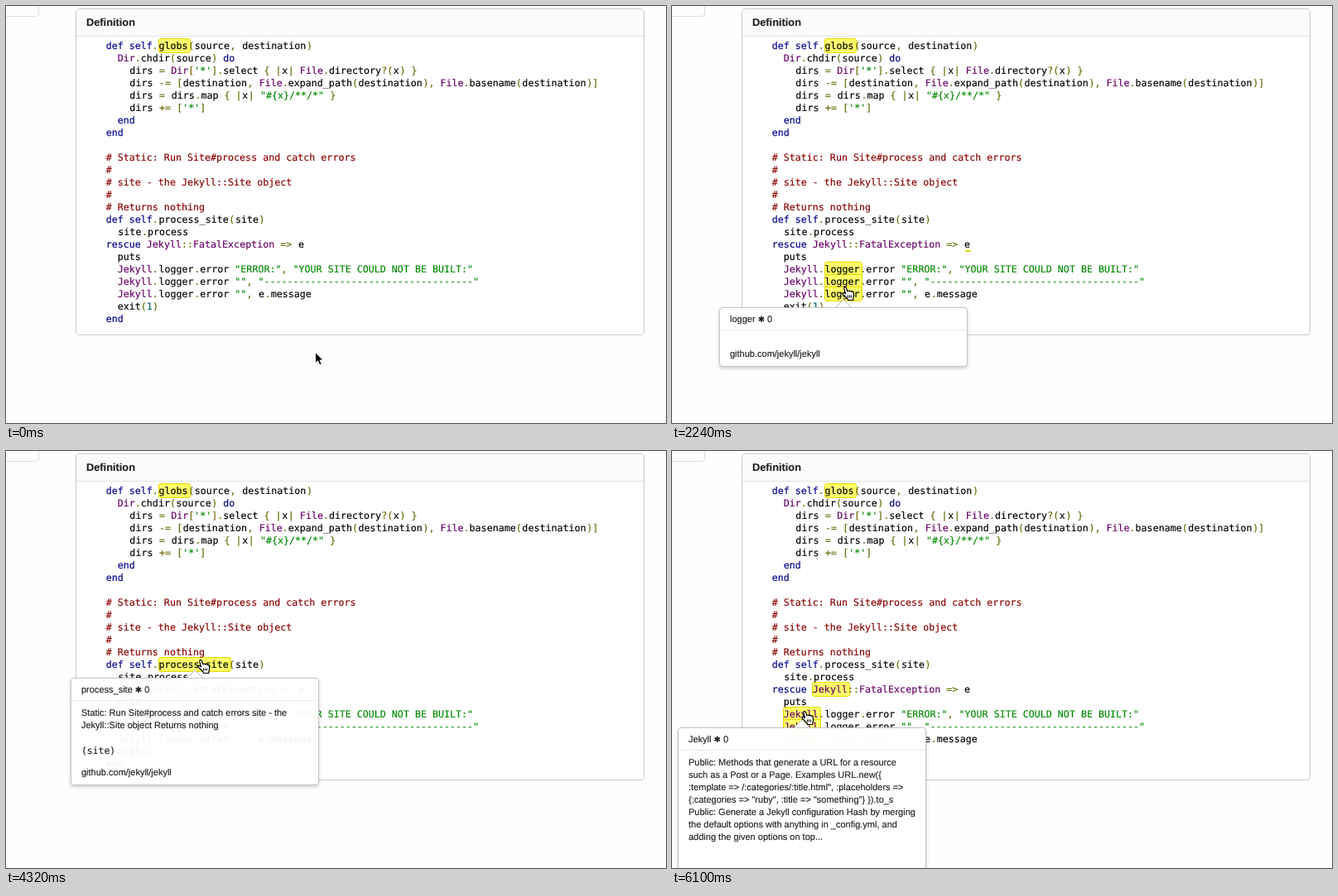
Recreate the animation shown at these times as an HTML page. Size 797 by 504 pixels, loop 8000 ms.

```html
<!DOCTYPE html>
<html lang="en">
<head>
<meta charset="utf-8">
<title>Definition</title>
<style>
html, body { margin: 0; width: 100%; height: 100%; overflow: hidden; }
body {
  position: relative; background: #fefefe; color: #222;
  font: 11px/15px "Liberation Sans", Arial, sans-serif;
  text-rendering: geometricPrecision; -webkit-text-stroke: .15px;
}
div, svg { position: absolute; box-sizing: border-box; }
#stage { left: 0; top: 0; width: 797px; height: 504px; overflow: hidden; }
#tab { left: -10px; top: -10px; width: 50px; height: 23px; border: 1px solid #ddd; border-radius: 4px; }
#panel { left: 84px; top: 3px; width: 687px; height: 395px; border: 1px solid #ccc; border-radius: 4px; background: #fff; }
#panel h1 {
  margin: 0; height: 33px; padding: 8px 12px 0; box-sizing: border-box;
  border-bottom: 1px solid #e2e2e2; border-radius: 3px 3px 0 0;
  background: #fbfbfb; font-size: 12.8px; line-height: 15px;
}
#code, .mono { font: 11.66px/15px "DejaVu Sans Mono", monospace; white-space: pre; }
#code { left: 120.7px; top: 40.5px; color: #000; }
.kwd { color: #008; } .typ { color: #606; } .pun { color: #660; }
.com { color: #800; } .str { color: #080; } .lit { color: #066; }
.ref { padding: 0 .6px; }
.mark { height: 18px; background: #ffff6a; border: 1px solid #e4d800; border-radius: 3px; }
#trace { left: 354px; top: 295px; width: 7px; height: 2px; background: #e4d800; }
.pop {
  width: 300px; border: 1px solid #c4c4c4; border-radius: 4px;
  box-shadow: 0 2px 4px rgba(0,0,0,.2); white-space: pre;
}
.pop::before {
  content: ""; position: absolute; left: 142px; top: -8px; width: 14px; height: 14px;
  box-sizing: border-box; border: solid #bbb; border-width: 1px 0 0 1px;
  background: inherit; transform: rotate(45deg); clip-path: polygon(0 0, 100% 0, 0 100%);
}
.pop div { left: 12px; }
.pop .head { left: 0; top: 0; width: 298px; height: 27px; padding: 7px 12px 0; border-bottom: 1px solid #ebebeb; }
.star { font: 10px/10px "DejaVu Sans", sans-serif; }
.pop .text { top: 35px; }
.pop .mono { top: 80px; font-size: 11.4px; }
.pop .repo { bottom: 6px; }
svg { left: 0; top: 0; overflow: visible; }
</style>
</head>
<body>
<div id="stage">
  <div id="tab"></div>
  <div id="panel"><h1>Definition</h1></div>
  <div id="marks"></div>
  <div id="trace"></div>
  <div id="code"></div>
  <div id="pops"></div>
  <svg id="cursor" width="18" height="20">
    <path id="arrow" d="M.5.5V13.8L3.6 10.9 5.8 16 8.2 15 6 10H10Z" fill="#000" stroke="#fff"/>
    <g id="hand" transform="translate(-4 -1)" fill="#fff" stroke="#000" stroke-width="1.2" stroke-linejoin="round">
      <path d="M4.6 9.8L2.9 4C2.3 1.4 4.6.6 5.4 2.8L6.9 7C7.1 5.7 9 5.6 9.5 7 9.9 5.9 11.7 6.1 12.1 7.6 12.7 6.8 14 7 14.3 8.5 14.9 11 15 13 13.8 15.5V17.5H7.5L7.2 16C5 14 3.5 12 1.2 10.2.1 8.8 2 7.8 3.2 8.8Z"/>
      <path d="M7.5 11.5V14.5M9.5 11.5V14.5M11.5 11.5V14.5" stroke-width="1"/>
    </g>
  </svg>
</div>
<script>
const $ = id => document.getElementById(id);
const esc = s => s.replace(/&/g, "&amp;").replace(/</g, "&lt;");

const source = `def self.globs(source, destination)
  Dir.chdir(source) do
    dirs = Dir['*'].select { |x| File.directory?(x) }
    dirs -= [destination, File.expand_path(destination), File.basename(destination)]
    dirs = dirs.map { |x| "#{x}/**/*" }
    dirs += ['*']
  end
end

# Static: Run Site#process and catch errors
#
# site - the Jekyll::Site object
#
# Returns nothing
def self.process_site(site)
  site.process
rescue Jekyll::FatalException => e
  puts
  Jekyll.logger.error "ERROR:", "YOUR SITE COULD NOT BE BUILT:"
  Jekyll.logger.error "", "${"-".repeat(36)}"
  Jekyll.logger.error "", e.message
  exit(1)
end`;

const rules = [
  ["com", "^#.*$"],
  ["str", "\"[^\"]*\"|'[^']*'"],
  ["kwd", "\\b(?:def|self|do|end|rescue)\\b"],
  ["ref", "\\b(?:globs|source|destination|dirs|x|process_site|site|logger|e)\\b"],
  ["typ", "\\b[A-Z]\\w*"],
  ["pln", "\\b[a-z]\\w*"],
  ["lit", "\\d+"],
  ["pun", "[^\\w\\s]+?"]
];
const lexer = new RegExp(rules.map(([name, re]) => `(?<${name}>${re})`).join("|"), "gm");
$("code").innerHTML = source.replace(lexer, (word, ...rest) => {
  const groups = rest[rest.length - 1];
  const kind = rules.find(([name]) => groups[name] !== undefined)[0];
  return `<span class="${kind}">${esc(word)}</span>`;
});

const summary = `Public: Methods that generate a URL for a resource
such as a Post or a Page. Examples URL.new({
:template => /:categories/:title.html", :placeholders =>
{:categories => "ruby", :title => "something"} }).to_s
Public: Generate a Jekyll configuration Hash by merging
the default options with anything in _config.yml, and
adding the given options on top...`;
const siteDoc = "Static: Run Site#process and catch errors site - the\nJekyll::Site object Returns nothing";
const jekyllMarks = [[169, 279, 46], [134, 309, 46], [134, 324, 46], [134, 339, 46]];

// Each hover: time span and step count, pointer goal, popover box, marked words
const hovers = [
  { from: 150, to: 1040, n: 7, at: [306, 351], name: "e", box: [159, 364, 72], alpha: 1,
    marks: [[352, 279, 11], [304, 339, 11]] },
  { from: 1940, to: 2380, n: 4, at: [209, 339], name: "logger", box: [57, 364, 72], alpha: 1,
    marks: [[184, 309, 46], [184, 324, 46], [184, 339, 46]] },
  { from: 2830, to: 3430, n: 5, at: [284, 252], name: "site", box: [142, 274, 72], alpha: .88,
    marks: [[276, 249, 32], [134, 264, 32]] },
  { from: 4020, to: 4320, n: 3, at: [235, 252], name: "process_site", box: [78, 274, 130], alpha: .95,
    marks: [[184, 249, 88]], text: siteDoc, args: "(site)" },
  { from: 5070, to: 5510, n: 4, at: [171, 294], name: "Jekyll", box: [42, 304, 190], alpha: .97,
    marks: jekyllMarks, text: summary },
  { from: 5658, to: 6100, n: 4, at: [160, 314], name: "Jekyll", box: [7, 334, 190], alpha: .98,
    marks: jekyllMarks, text: summary }
];
const start = [373, 418];

function add(parent, cls, css, html = "") {
  const el = document.createElement("div");
  el.className = cls;
  el.style.cssText = css;
  el.innerHTML = html;
  return parent.appendChild(el);
}
const addMark = (parent, [x, y, w]) => add(parent, "mark", `left:${x}px;top:${y}px;width:${w}px`);

addMark($("marks"), [184, 39, 39]);
for (const h of hovers) {
  const [x, y, height] = h.box;
  h.layer = add($("marks"), "", "");
  h.marks.forEach(m => addMark(h.layer, m));
  h.pop = add($("pops"), "pop",
    `left:${x}px;top:${y}px;height:${height}px;background:rgba(255,255,255,${h.alpha})`,
    `<div class="head">${h.name} <span class="star">✱</span> 0</div>` +
    (h.text ? `<div class="text">${esc(h.text)}</div>` : "") +
    (h.args ? `<div class="mono">${h.args}</div>` : "") +
    `<div class="repo">github.com/jekyll/jekyll</div>`);
}

function draw(t) {
  const now = hovers.filter(h => h.from <= t).length - 1;
  const cur = hovers[now];
  let step = 0, go = 0, pos = start;
  if (cur) {
    step = Math.min(cur.n - 1, Math.floor((t - cur.from) / (cur.to - cur.from) * (cur.n - 1) + .05));
    go = Math.min(1, (step + 1) / (cur.n - 2));
    const prev = now ? hovers[now - 1].at : start;
    pos = prev.map((p, i) => Math.round(p + (cur.at[i] - p) * go));
  }
  hovers.forEach((h, i) => {
    let fade = 0;
    if (i === now && go === 1) fade = step > h.n - 3 ? 1 : .5;
    if (i === now - 1 && go < 1 && step === 0) fade = .5;
    h.pop.style.opacity = fade;
    h.layer.style.display = i === now && go === 1 ? "" : "none";
  });
  $("trace").style.display = now === 1 && step < 3 ? "" : "none";
  $("arrow").style.display = go < 1 ? "" : "none";
  $("hand").style.display = go < 1 ? "none" : "";
  $("cursor").style.transform = `translate(${pos[0]}px, ${pos[1]}px)`;
}

const began = performance.now();
function tick() {
  draw((performance.now() - began) % 8000);
  requestAnimationFrame(tick);
}
tick();
</script>
</body>
</html>
```
